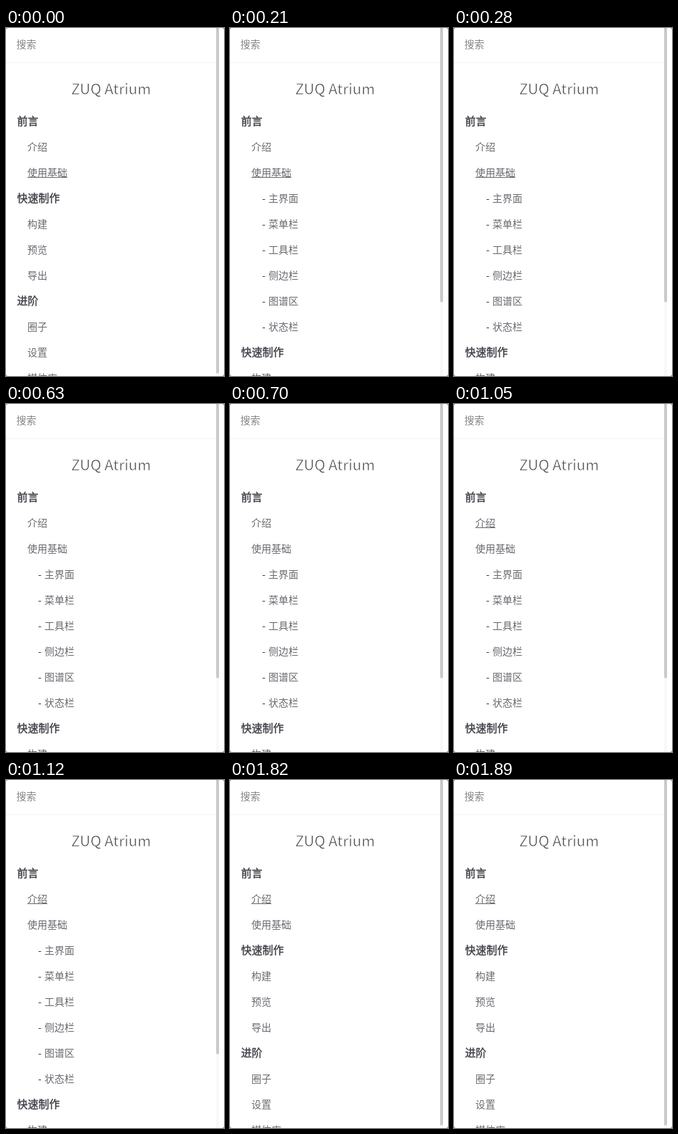
Write an HTML page that moves like this. It is 306 px wide and 488 px high and loops after 2030 ms.

```html
<!DOCTYPE html>
<html lang="zh-CN">
<head>
<meta charset="utf-8">
<title>Sidebar</title>
<style>
  html, body { margin: 0; width: 100%; height: 100%; overflow: hidden; background: #8c8c8c; }
  svg {
    display: block; width: 306px; height: 488px;
    background: #fff; border-radius: 3px;
    font: 14px "Noto Sans CJK SC", "Noto Sans CJK JP", "Noto Sans CJK", sans-serif;
    fill: #686a6f;
  }
  /* a white outline thins the letters, a dark one thickens them */
  .title {
    font-size: 20.6px; font-weight: 300; text-anchor: middle;
    fill: #484a50; stroke: #fff; stroke-width: 0.55px;
  }
  .head { font-size: 15px; fill: #3e3e47; stroke: #3e3e47; stroke-width: 0.4px; }
  .dash { fill: #3a3a44; }
  .search { fill: #858585; }

  .sub, .rest, .thumb, .line { animation: 2030ms step-end infinite; }
  .sub { animation-name: expand; }
  .rest { animation-name: push; }
  .thumb { animation-name: resize; }
  .line-basics { animation-name: leave; }
  .line-intro { animation-name: enter; }

  /* open at 210 ms, close at 1820 ms */
  @keyframes expand {
    0%, 89.6552%, 100% { visibility: hidden; }
    10.3448% { visibility: visible; }
  }
  @keyframes push {
    0%, 89.6552%, 100% { transform: translateY(0); }
    10.3448% { transform: translateY(216px); }
  }
  @keyframes resize {
    0%, 89.6552%, 100% { transform: translateY(0); }
    10.3448% { transform: translateY(-100px); }
  }
  /* hover moves away at 630 ms and arrives at 980 ms */
  @keyframes leave {
    0% { visibility: visible; }
    31.0345%, 100% { visibility: hidden; }
  }
  @keyframes enter {
    0% { visibility: hidden; }
    48.2759%, 100% { visibility: visible; }
  }
</style>
</head>
<body>
<svg viewBox="0 0 306 488">
  <text class="search" x="14.5" y="28">搜索</text>
  <rect y="48" width="295" height="1" fill="#f2f2f2"/>
  <text class="title" x="147.5" y="93">ZUQ Atrium</text>

  <text class="head" x="15.5" y="136">前言</text>
  <text x="30" y="172">介绍</text>
  <rect class="line line-intro" x="30" y="173" width="28" height="1"/>
  <text x="30" y="208">使用基础</text>
  <rect class="line line-basics" x="30" y="209" width="56" height="1"/>

  <g class="sub"></g>
  <g class="rest"></g>

  <rect x="295" width="4" height="488" fill="#f8f8f8"/>
  <rect class="thumb" x="295" y="-120" width="4" height="604.5" rx="2" fill="#c8c9ca"/>
</svg>
<script>
  const ROW = 36, TOP = 244;
  const sub = document.querySelector('.sub');
  const rest = document.querySelector('.rest');

  function addText(parent, text, x, y, name) {
    const el = document.createElementNS('http://www.w3.org/2000/svg', 'text');
    el.setAttribute('x', x);
    el.setAttribute('y', y);
    if (name) el.setAttribute('class', name);
    el.textContent = text;
    parent.append(el);
  }

  ['主界面', '菜单栏', '工具栏', '侧边栏', '图谱区', '状态栏'].forEach((label, i) => {
    const y = TOP + i * ROW;
    addText(sub, '-', 45, y, 'dash');
    addText(sub, label, 54, y);
  });

  ['#快速制作', '构建', '预览', '导出', '#进阶', '圈子', '设置', '媒体库'].forEach((label, i) => {
    const y = TOP + i * ROW;
    if (label[0] === '#') addText(rest, label.slice(1), 15.5, y, 'head');
    else addText(rest, label, 30, y);
  });
</script>
</body>
</html>
```
